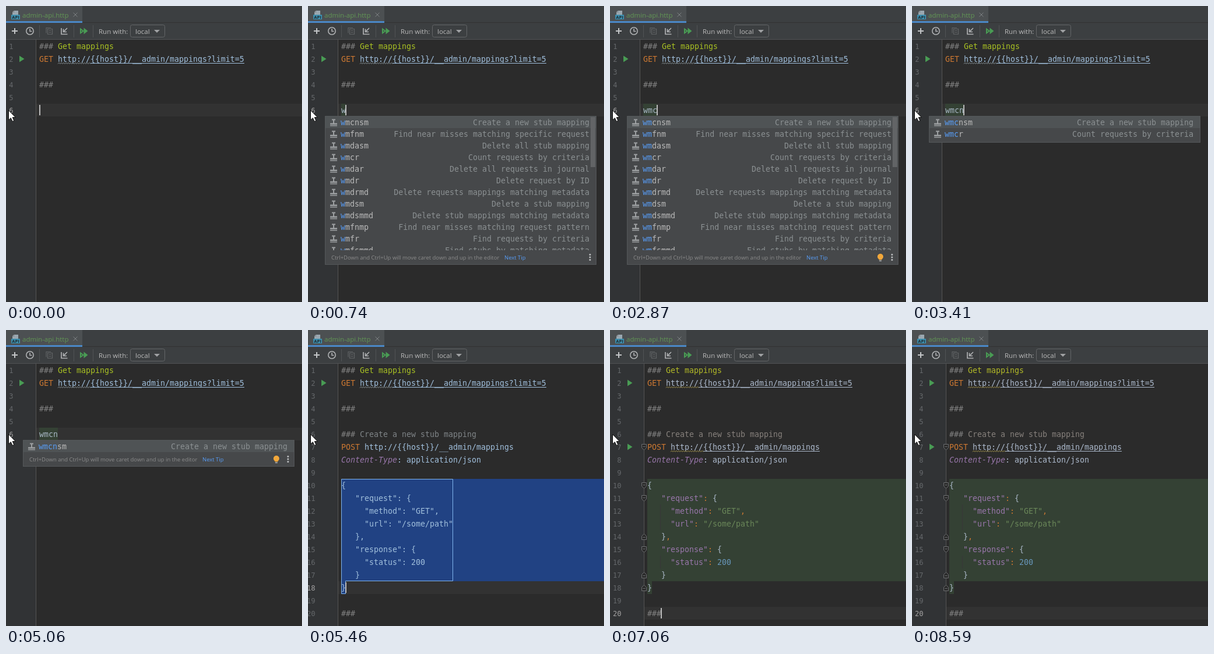
Animation, 508 px wide and 509 px high, one loop 9050 ms. Source, as an HTML page with a canvas:

```html
<!DOCTYPE html>
<html lang="en">
<head>
<meta charset="utf-8">
<title>HTTP client live templates</title>
<style>
  html, body { margin: 0; width: 100%; height: 100%; overflow: hidden; background: #2b2b2b; }
  canvas { display: block; }
</style>
</head>
<body>
<canvas id="stage" width="508" height="509"></canvas>
<script>
const ctx = document.getElementById('stage').getContext('2d');
const LOOP = 9050, ROW = 22, CHAR = 8, TOP = 58;
const MONO = '"DejaVu Sans Mono", "Noto Sans Mono", monospace';
const CODE = '13.29px ' + MONO;
const UI = '"Open Sans", "Noto Sans", sans-serif';

const EARLY = { url: '#a0bfdc', todo: '#a8c023', comment: '#808080', desc: '#7f8487', wave: '#8e999d' };
const LATE = { url: '#acb9cc', todo: '#b2b927', comment: '#808080', desc: '#86807c', wave: '#a8974e' };
const SYNTAX = { verb: '#cc7832', header: '#9876aa', key: '#9876aa', str: '#6a8759', num: '#6897bb', punct: '#cc7832', brace: '#a9b7c6' };

const TEMPLATES = [
  ['wmcnsm', 'Create a new stub mapping'],
  ['wmfnm', 'Find near misses matching specific request'],
  ['wmdasm', 'Delete all stub mapping'],
  ['wmcr', 'Count requests by criteria'],
  ['wmdar', 'Delete all requests in journal'],
  ['wmdr', 'Delete request by ID'],
  ['wmdrmd', 'Delete requests mappings matching metadata'],
  ['wmdsm', 'Delete a stub mapping'],
  ['wmdsmmd', 'Delete stub mappings matching metadata'],
  ['wmfnmp', 'Find near misses matching request pattern'],
  ['wmfr', 'Find requests by criteria'],
  ['wmfsmmd', 'Find stubs by matching metadata']
];

// Each body line: [indent, [text, kind], ...]
const BODY = [
  [0, ['{', 'brace']],
  [3, ['"request"', 'key'], [':', 'punct'], [' {', 'brace']],
  [5, ['"method"', 'key'], [': ', 'punct'], ['"GET"', 'str'], [',', 'punct']],
  [5, ['"url"', 'key'], [': ', 'punct'], ['"/some/path"', 'str']],
  [3, ['}', 'brace'], [',', 'punct']],
  [3, ['"response"', 'key'], [':', 'punct'], [' {', 'brace']],
  [5, ['"status"', 'key'], [': ', 'punct'], ['200', 'num']],
  [3, ['}', 'brace']],
  [0, ['}', 'brace']]
];

const CARET_ON = [[0, 470], [680, 1270], [1400, 1870], [2470, 3940], [4530, 5060], [5460, 6530], [7060, 8590]];
const BULB_ON = [[1340, 1400], [2000, 2930], [4000, 5460]];
const within = (t, spans) => spans.some(([from, to]) => t >= from && t < to);
const stepAt = (t, steps) => steps.filter(([from]) => t >= from).pop()[1];
const lineTop = n => TOP + ROW * (n - 1);

function rect(x, y, w, h, color) {
  ctx.fillStyle = color;
  ctx.fillRect(x, y, w, h);
}

function text(str, x, y, color, font = CODE, align = 'left') {
  ctx.font = font;
  ctx.textAlign = align;
  ctx.fillStyle = color;
  ctx.fillText(str, x, y);
}

function shape(d, color, width) {
  const path = new Path2D(d);
  if (width) {
    ctx.strokeStyle = color;
    ctx.lineWidth = width;
    ctx.stroke(path);
  } else {
    ctx.fillStyle = color;
    ctx.fill(path);
  }
}

function disc(x, y, r, color) {
  ctx.beginPath();
  ctx.arc(x, y, r, 0, 7);
  ctx.fillStyle = color;
  ctx.fill();
}

function codeLine(n, x, ...parts) {
  for (const [str, color, style = ''] of parts) {
    text(str, x, lineTop(n) + 16, color, style + CODE);
    x += str.length * CHAR;
  }
}

function linkLine(n, x, url, colors) {
  const y = lineTop(n) + 18, scheme = 'http://'.length * CHAR;
  let wave = `M${x} ${y + 1.5}`;
  for (let i = 0; i < scheme / 2; i++) wave += `l2 ${i % 2 ? 2 : -2}`;
  shape(wave, colors.wave, 1);
  rect(x + scheme, y, url.length * CHAR - scheme, 1, colors.url);
}

function runIcon(x, n) {
  const y = lineTop(n) + 11;
  shape(`M${x} ${y - 5.5}l8.5 5.5l-8.5 5.5z`, '#499c54');
}

function drawChrome() {
  rect(0, 0, 508, 58, '#3c3f41');
  rect(0, 0, 131, 26, '#4c5052');
  rect(0, 26, 131, 3, '#4a88c7');
  rect(131, 28, 377, 1, '#323232');
  rect(0, 57, 508, 1, '#515355');

  shape('M14 8H21V15H11V11H14z', '#9aa7b0');
  shape('M11 10.5L13.5 8V10.5z', '#c0c8cd');
  rect(9, 15, 15, 8, '#3d8fae');
  text('API', 16.5, 22, '#1f2a30', 'bold 7.5px ' + UI, 'center');
  text('admin-api.http', 28, 20, '#629755', '11.5px ' + UI);
  shape('M115.5 11.5l7 7m0 -7l-7 7', '#7d8183', 1);

  shape('M10 43h10M15 38v10', '#c4c6c8', 2);
  shape('M34.8 43a6.2 6.2 0 1 0 12.4 0a6.2 6.2 0 1 0 -12.4 0M41 39v4.5h3.5', '#afb1b3', 1.6);
  for (const x of [57, 116, 149]) rect(x, 33, 1, 21, '#515355');
  shape('M69 46.5V37.5H77M71.5 39.5h8v9h-8zM73.5 42.5h4M73.5 45.5h4', '#606365', 1.2);
  shape('M95 38v10.5h10.5M105 38l-6.5 6.5M98.5 39.5v5h5.5', '#afb1b3', 1.7);
  shape('M127 37.5l7 5.5l-7 5.5zM133.5 37.5l7 5.5l-7 5.5z', '#499c54');
  shape('M129 41.5l2 1.5l-2 1.5z', '#3c3f41');

  text('Run with:', 159, 48, '#bbbbbb', '11.5px ' + UI);
  ctx.beginPath();
  ctx.roundRect(213.5, 32.5, 59, 21, 3);
  ctx.strokeStyle = '#646668';
  ctx.lineWidth = 1;
  ctx.stroke();
  text('local', 222, 48, '#bbbbbb', '11.5px ' + UI);
  shape('M254 41h10l-5 5z', '#a0a2a4');
}

function drawGutter(width, lines, current) {
  rect(0, TOP, width, 451, '#313335');
  rect(width, TOP, 1, 451, '#555555');
  for (let n = 1; n <= lines; n++) {
    text(n, width - 38.5, lineTop(n) + 16, n === current ? '#a4a3a3' : '#65686b', '12px ' + MONO, 'right');
  }
}

function drawFolds(x) {
  for (const [n, dir] of [[7, 1], [10, 1], [11, 1], [15, 1], [14, -1], [17, -1], [18, -1]]) {
    const y = lineTop(n) + 11.5;
    const d = `M${x - 4} ${y - 5 * dir}h8v${6 * dir}l-4 ${4 * dir}l-4 ${-4 * dir}z`;
    shape(d, '#2b2b2b');
    shape(d, '#6c6e70', 1);
    shape(`M${x - 2} ${y - dir}h4`, '#6c6e70', 1);
  }
}

function drawSnippet(t, x, colors) {
  const highlighted = t >= 5790, linked = t >= 5860, accepted = t >= 7060;
  const top = lineTop(10), last = lineTop(18);
  const fill = accepted ? '#344134' : '#214283';
  rect(x, top, 508 - x, last - top, fill);
  rect(x, last, CHAR, ROW, fill);

  codeLine(6, x, ['### ', colors.comment], ['Create a new stub mapping', colors.desc]);
  const url = 'http://{{host}}/__admin/mappings';
  codeLine(7, x, ['POST ', SYNTAX.verb], [url, colors.url]);
  codeLine(8, x, ['Content-Type', SYNTAX.header, 'italic '], [': application/json', colors.url]);
  if (linked) linkLine(7, x + 5 * CHAR, url, colors);

  BODY.forEach(([indent, ...parts], i) => {
    codeLine(10 + i, x + indent * CHAR, ...parts.map(([str, kind]) => [str, highlighted ? SYNTAX[kind] : colors.url]));
  });
  codeLine(20, x, ['###', colors.comment]);

  if (highlighted) {
    rect(x + 22, lineTop(12), 1, 2 * ROW, '#373737');
    rect(x + 22, lineTop(16), 1, ROW, '#373737');
    drawFolds(x - 5.5);
  }
  if (linked) runIcon(30, 7);
  if (!accepted) shape(`M${x + .5} ${top + .5}h191v${last - top - 1}h-184v${ROW}h-7z`, '#7fb4ee', 1);
}

function drawStamp(x, y) {
  shape(`M${x + 4} ${y - 5.5}h6v2h-2v5h5v2.5h-12v-2.5h5v-5h-2z`, '#9da0a2');
  rect(x + 1, y + 5, 12, 1.5, '#9da0a2');
}

function drawPopup(t) {
  const prefix = stepAt(t, [[0, 'w'], [1400, 'wm'], [2930, 'wmc'], [3470, 'wmcn']]);
  const resizing = t >= 3410 && t < 3470;
  const rows = TEMPLATES.filter(([name]) => name.startsWith(prefix));
  const left = 29, top = 190, width = 466;
  const listHeight = Math.min(rows.length * 20, 230);
  const height = resizing ? 45 : listHeight + 25;
  const footer = top + listHeight;

  rect(left, top - 1, width, height + 1, '#55585a');
  rect(left + 1, top, width - 2, height - 1, '#46484a');
  rect(left + 1, top, width - 2, 20, '#4f5355');

  ctx.save();
  ctx.beginPath();
  ctx.rect(left, top, width, listHeight);
  ctx.clip();
  rows.forEach(([name, about], i) => {
    const y = top + 10 + i * 20;
    drawStamp(37, y);
    text(prefix, 56, y + 5, '#589df6');
    text(name.slice(prefix.length), 56 + prefix.length * CHAR, y + 5, '#bbbbbb');
    text(about, 483, y + 5, '#8b9092', CODE, 'right');
  });
  ctx.restore();
  if (rows.length > 11) rect(485, 191, 8, 86, '#626466');
  if (resizing) return;

  rect(left + 1, footer, width - 2, 24, '#46484a');
  text('Ctrl+Down and Ctrl+Up will move caret down and up in the editor', 40, footer + 16, '#8c8c8c', '9.5px ' + UI);
  text('Next Tip', 337, footer + 16, '#589df6', '9.5px ' + UI);
  for (const dy of [7.5, 12, 16.5]) disc(484, footer + dy, 1.5, '#bfc1c3');
  if (within(t, BULB_ON)) {
    disc(464, footer + 11, 5, '#f2a83b');
    rect(461.5, footer + 14, 5, 2.5, '#f2a83b');
    rect(462, footer + 17.5, 4, 1.5, '#b0b2b4');
  }
}

function draw(t) {
  const inserted = t >= 5460, wide = t >= 5520;
  const colors = wide ? LATE : EARLY;
  const gutter = wide ? 58 : 51, x = gutter + 6;
  const current = !inserted ? 6 : t < 7060 ? 18 : 20;
  const typed = stepAt(t, [[0, ''], [680, 'w'], [1400, 'wm'], [2870, 'wmc'], [3410, 'wmcn']]);

  rect(0, 0, 508, 509, '#2b2b2b');
  drawChrome();
  drawGutter(gutter, inserted ? 20 : 6, current);
  rect(gutter + 1, lineTop(current), 508, ROW, '#323232');

  const url = 'http://{{host}}/__admin/mappings?limit=5';
  codeLine(1, x, ['### ', colors.comment], ['Get mappings', colors.todo]);
  codeLine(2, x, ['GET ', SYNTAX.verb], [url, colors.url]);
  linkLine(2, x + 4 * CHAR, url, colors);
  codeLine(4, x, ['###', colors.comment]);
  runIcon(gutter - 28, 2);

  if (inserted) {
    drawSnippet(t, x, colors);
  } else {
    if (t >= 740) rect(x, lineTop(6), typed.length * CHAR, ROW, '#344134');
    codeLine(6, x, [typed, '#a9b7c6']);
  }

  if (within(t, CARET_ON)) {
    const column = !inserted ? typed.length : current === 18 ? 1 : 3;
    rect(x + column * CHAR - (column ? 1 : 0), lineTop(current) + 2, 2, 18, '#bbbbbb');
  }
  if (t >= 740 && !inserted) drawPopup(t);

  const pointer = 'M4.5 179.5v16.5l3.8 -3.5l2.7 6l2.8 -1.2l-2.6 -5.8h5z';
  shape(pointer, '#ffffff');
  shape(pointer, '#111111', 1);
}

function tick() {
  draw(performance.now() % LOOP);
  requestAnimationFrame(tick);
}
tick();
</script>
</body>
</html>
```
